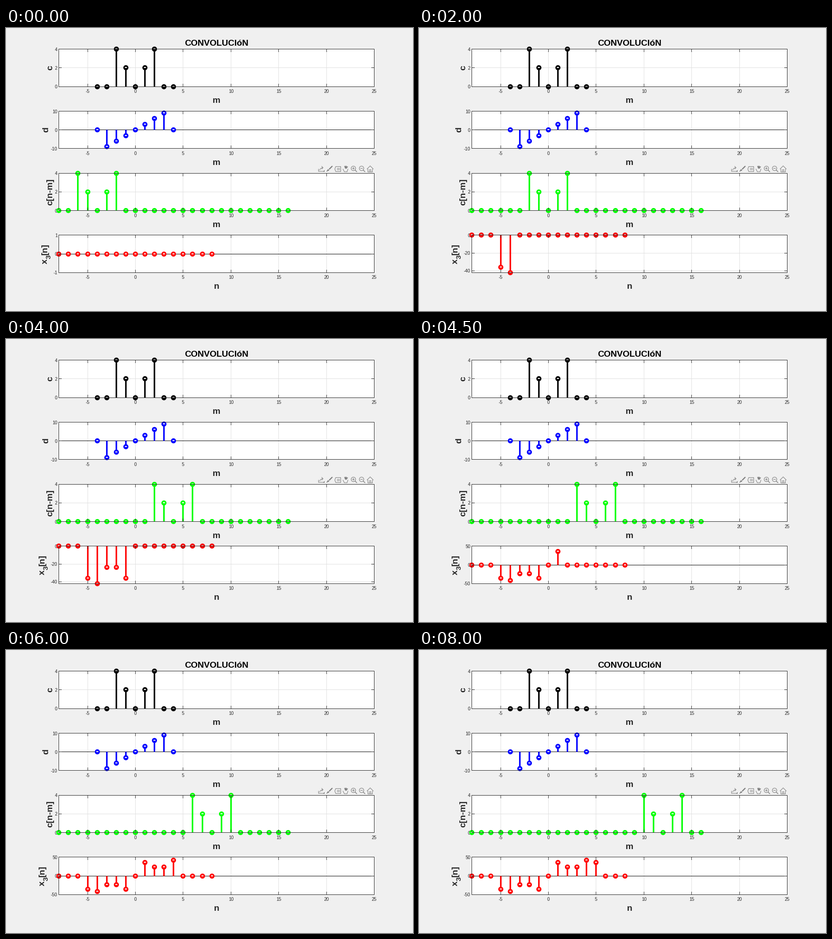
A matplotlib script for the animation above (8.5 s loop, 898x624 px).

```python
import numpy as np
import matplotlib.pyplot as plt
from matplotlib.animation import FuncAnimation
from matplotlib.patches import Circle, Ellipse, Polygon, Rectangle

W, H, DPI = 898, 624, 64
PX = 72 / DPI  # points per pixel
LEFT, RIGHT = 0.13 * W, 0.905 * W
TOP, PITCH, HEIGHT = 0.075 * H, 0.2191 * H, 82.3
MIDDLE = (LEFT + RIGHT) / 2
DARK, GRID, ICON = "#262626", "#dfdfdf", "#808080"
TICK = 6.5
STEPS = 17

plt.rcParams["font.family"] = "Liberation Sans"
fig = plt.figure(figsize=(W / DPI, H / DPI), dpi=DPI, facecolor="#f0f0f0")
ax = fig.add_axes([0, 0, 1, 1])
ax.set_xlim(0, W)
ax.set_ylim(H, 0)
ax.axis("off")

# Signals on m = -4..4 and their full convolution on n = -8..8
m = np.arange(-4, 5)
c = np.where(abs(m) <= 2, 2 * abs(m), 0)
d = np.where(abs(m) <= 3, 3 * m, 0)
n = np.arange(-8, 9)
x3 = np.convolve(c, d)
shift_axis = np.arange(-8, 17)


def snap(v):
    """Centre of the pixel that holds v."""
    return np.floor(v) + 0.5


def edges(row):
    top = TOP + row * PITCH
    return top, top + HEIGHT


def px_x(v):
    return snap(LEFT + (v + 8) * (RIGHT - LEFT) / 33)


def raw_y(v, row, lim):
    top, bottom = edges(row)
    return bottom - (v - lim[0]) * (bottom - top) / (lim[1] - lim[0])


def px_y(v, row, lim):
    return snap(raw_y(v, row, lim))


def line(xs, ys, color=DARK, width=1.0, z=4, cap="butt"):
    return ax.plot(xs, ys, color=color, lw=width * PX, zorder=z, snap=False,
                   solid_capstyle=cap)[0]


def text(x, y, s, size=10, color=DARK, **kw):
    return ax.text(x, y, s, fontsize=size * PX, color=color, zorder=2,
                   va="baseline", **kw)


def bold(x, y, s, size=19.2, rotation=90, ha="center", color=DARK):
    return text(x, y, s, size, color, weight="bold", rotation=rotation,
                rotation_mode="anchor", ha=ha)


def draw_box(row, xlabel):
    bottom = edges(row)[1]
    x0, x1 = snap(LEFT), snap(RIGHT)
    y0, y1 = snap(np.array(edges(row)))
    ax.add_patch(Rectangle((x0, y0), x1 - x0, y1 - y0, fc="white", ec="none",
                           zorder=0))
    for v in range(-5, 26, 5):
        x = px_x(v)
        if v < 25:
            line([x, x], [y0, y1], GRID, z=1)
            line([x, x], [y1, y1 - TICK])
            line([x, x], [y0, y0 + TICK])
        text(x, bottom + 14, str(v), ha="center")
    line([x0, x1, x1, x0, x0], [y0, y0, y1, y1, y0], cap="projecting")
    bold(MIDDLE, bottom + 36, xlabel, rotation=0)


def draw_scale(row, lim, ticks):
    """Horizontal grid, y ticks, y numbers and the zero line."""
    x0, x1 = snap(LEFT), snap(RIGHT)
    made = []
    for v in ticks:
        y = px_y(v, row, lim)
        made.append(text(113.5, raw_y(v, row, lim) + 4, str(v), ha="right"))
        if v not in lim:
            made.append(line([x0, x1], [y, y], GRID, z=1))
        made.append(line([x0, x0 + TICK], [y, y]))
        made.append(line([x1, x1 - TICK], [y, y]))
    zero = px_y(0, row, lim)
    made.append(line([x0, x1], [zero, zero], "black", z=2))
    return made


def draw_stems(row, pos, values, lim, color):
    zero = px_y(0, row, lim)
    made = []
    for x, y in zip(px_x(pos), px_y(values, row, lim)):
        if y != zero:
            made.append(line([x, x], [zero, y], color, 3.4, z=3))
        made.append(ax.add_patch(Circle((x, y), 5.6, fc=color, ec="none",
                                        zorder=3)))
        made.append(ax.add_patch(Ellipse((x, y - 0.5), 5, 2.4, fc="white",
                                         ec="none", zorder=3.5)))
    return made


def draw_toolbar():
    def origin(slot):
        return np.array([695.5 + 18 * slot, 311])

    def stroke(slot, pts, width=1.1):
        line(*(origin(slot) + pts).T, color=ICON, width=width, cap="round")

    def arc(slot, x, y, r, start, stop):
        a = np.radians(np.linspace(start, stop, 20))
        stroke(slot, np.c_[x + r * np.cos(a), y + r * np.sin(a)])

    def blob(slot, pts):
        ax.add_patch(Polygon(origin(slot) + pts, fc=ICON, ec="none", zorder=4))

    # export: tray, bent arrow, menu corner
    stroke(0, [(-6, 0), (-6, 5), (4, 5)])
    arc(0, 4, 5, 8, 200, 270)
    stroke(0, [(1, -6), (4, -3), (1, 0)])
    blob(0, [(7, 2), (7, 6), (3, 6)])
    # brush
    stroke(1, [(6, -6), (0, 0)], 2.4)
    blob(1, [(-3, 0), (0, 3), (-7, 6)])
    # data tip
    stroke(2, [(-4, -5.5), (7, -5.5), (7, 5.5), (-4, 5.5), (-6, 0), (-4, -5.5)])
    for y in (-1.5, 1.5):
        stroke(2, [(-1, y), (5, y)])
    # hand: fingers fanned around the palm
    for angle in np.radians((-110, -92, -74, -52)):
        ray = np.array([np.cos(angle), np.sin(angle)])
        stroke(3, [ray * 2, ray * 6.5], 1.8)
    stroke(3, [(-6, 0), (-3, 6), (3, 6), (5, 0)])
    # zoom in, zoom out
    for slot in (4, 5):
        arc(slot, -1, -1.5, 5, 0, 360)
        stroke(slot, [(2.6, 2.1), (6.5, 6)], 1.5)
        stroke(slot, [(-3.5, -1.5), (1.5, -1.5)])
    stroke(4, [(-1, -4), (-1, 1)])
    # home
    stroke(6, [(-7, 0), (0, -7), (7, 0)])
    stroke(6, [(-5, 0), (-5, 6.5), (5, 6.5), (5, 0)])
    stroke(6, [(-1.5, 6), (-1.5, 1.5), (1.5, 1.5), (1.5, 6)])


def result_scale(values):
    low, high = values.min(), values.max()
    if high > 0:
        return (-50, 50), range(-50, 51, 50)
    if low < 0:
        return (min(low, -40), 0), range(-40, 1, 20)
    return (-1, 1), range(-1, 2)


def draw_result_label(base):
    y = edges(3)[0] + HEIGHT / 2 + 21.5
    return [bold(base, y, "x", ha="left"),
            bold(base + 8, y - 10.7, "3", size=15.4, ha="left"),
            bold(base, y - 19.3, "[n]", ha="left")]


for row, name in enumerate("mmmn"):
    draw_box(row, name)
bold(MIDDLE, 39, "CONVOLUCIóN", rotation=0, color="black")

C_LIM, D_LIM = (0, 4), (-10, 10)
for row, lim, name, base in ((0, C_LIM, "c", 102), (1, D_LIM, "d", 93),
                             (2, C_LIM, "c[n-m]", 102)):
    draw_scale(row, lim, np.linspace(*lim, 3, dtype=int))
    bold(base, sum(edges(row)) / 2, name)
draw_stems(0, m, c, C_LIM, "black")
draw_stems(1, m, d, D_LIM, "blue")
draw_toolbar()

moving = []


def update(step):
    while moving:
        moving.pop().remove()
    shifted = np.zeros(len(shift_axis), int)
    shifted[step:step + len(c)] = c[::-1]
    moving.extend(draw_stems(2, shift_axis, shifted, C_LIM, "lime"))

    done = np.where(np.arange(len(n)) <= step, x3, 0)
    lim, ticks = result_scale(done)
    moving.extend(draw_scale(3, lim, ticks))
    moving.extend(draw_result_label(85 if done.any() else 90.5))
    moving.extend(draw_stems(3, n, done, lim, "red"))
    return moving


anim = FuncAnimation(fig, update, frames=STEPS, interval=500,
                     init_func=lambda: [], repeat=True, repeat_delay=0)
plt.show()
```
